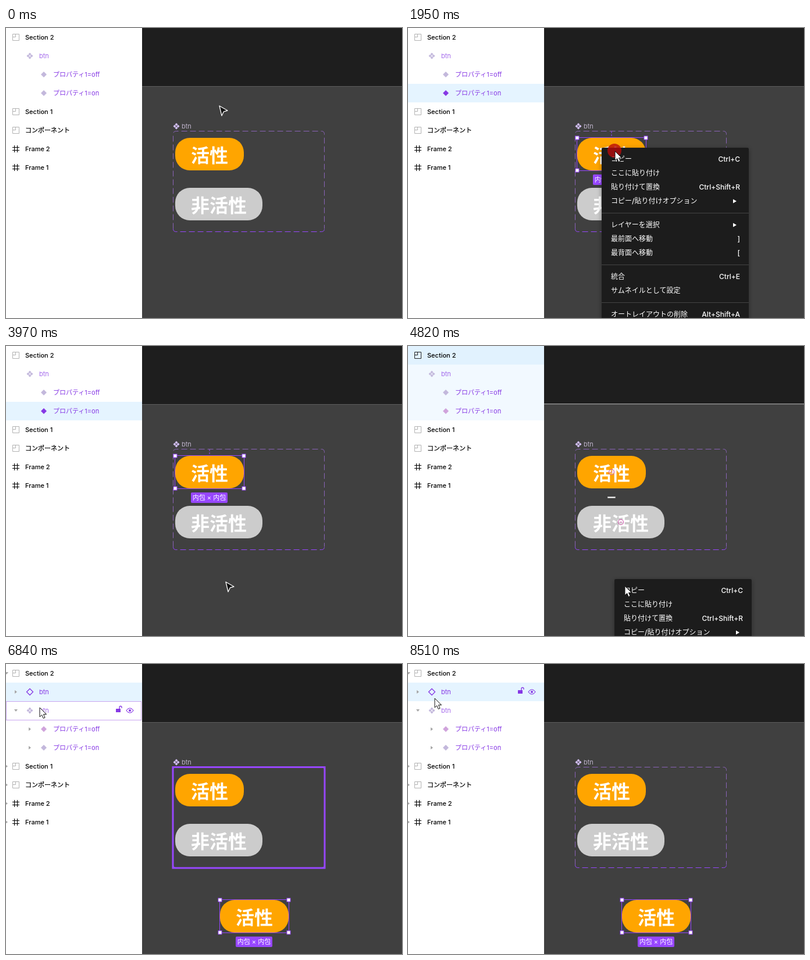
Write an HTML page that moves like this. It is 681x499 px and loops after 9.24 s.

```html
<!DOCTYPE html>
<html lang="ja">
<head>
<meta charset="utf-8">
<title>Component layers</title>
<style>
html, body { margin: 0; width: 100%; height: 100%; overflow: hidden; background: #1e1e1e; }
svg { display: block; width: 681px; height: 499px; }
text { font: 400 11px Inter, "Noto Sans CJK JP", "Noto Sans CJK", sans-serif; white-space: pre; }
.strong { font-weight: 500; fill: #000; }
.ja { stroke: #000; stroke-width: .25px; }
.purple { fill: #8638e5; }
.menu text { font-size: 12px; font-weight: 500; fill: #fff; }
.label { font-family: "Noto Sans CJK JP", "Noto Sans CJK", sans-serif; font-size: 32px; font-weight: 700; fill: #fff; }
.line { fill: none; stroke: #9747ff; }
.end { text-anchor: end; }
</style>
</head>
<body>
<svg id="stage" viewBox="0 0 681 499"></svg>
<script>
const LOOP = 9240;
const stage = document.getElementById('stage');

const rect = (x, y, w, h, fill, extra = '') =>
  `<rect x="${x}" y="${y}" width="${w}" height="${h}" fill="${fill}" ${extra}/>`;
const text = (x, y, s, cls = '', extra = '') =>
  `<text x="${x}" y="${y}" class="${cls}" ${extra}>${s}</text>`;
const path = (d, fill, extra = '') => `<path d="${d}" fill="${fill}" ${extra}/>`;
const group = (id, body, extra = '') => `<g id="${id}" ${extra}>${body}</g>`;
const outline = (x, y, w, h, sw) => `<rect class="line" x="${x}" y="${y}" width="${w}" height="${h}" stroke-width="${sw}"/>`;
const diamond = (x, y, r) => `M${x} ${y - r}l${r} ${r}l${-r} ${r}l${-r} ${-r}z`;
const fourDiamonds = (x, y) =>
  [[0, -3], [3, 0], [0, 3], [-3, 0]].map(([a, b]) => diamond(x + a, y + b, 2.5)).join('');

// Canvas parts
const button = (x, y, w, fill, s) =>
  rect(x, y, w, 56, fill, 'rx="25"') + text(x + 27, y + 42, s, 'label');

const selection = (x, y) => outline(x - .5, y - .5, 119, 57, 1) +
  [[0, 0], [118, 0], [0, 56], [118, 56]].map(([a, b]) =>
    rect(x + a - 3, y + b - 3, 6, 6, '#fff', 'stroke="#9747ff"')).join('');

const tag = (x, y) => rect(x, y, 63, 18, '#9747ff', 'rx="2"') +
  text(x + 31.5, y + 13, '内包 × 内包', '', 'fill="#fff" text-anchor="middle"');

const marker = (x, y) => `<circle cx="${x}" cy="${y}" r="4.5" fill="#fff" fill-opacity=".3" stroke="#d05cae" stroke-width="1.2"/>` +
  path(`M${x - 2} ${y}h4`, 'none', 'stroke="#d05cae"');

const dashed = (d, color) => path(d, 'none', `stroke="${color}" stroke-dasharray="10 5"`);

const MENU = [
  [20, 'コピー', 'Ctrl+C'], [44, 'ここに貼り付け'], [68, '貼り付けて置換', 'Ctrl+Shift+R'],
  [92, 'コピー/貼り付けオプション', '>'], [133, 'レイヤーを選択', '>'],
  [157, '最前面へ移動', ']'], [181, '最背面へ移動', '['], [222, '統合', 'Ctrl+E'],
  [246, 'サムネイルとして設定'], [287, 'オートレイアウトの削除', 'Alt+Shift+A']
];

function menu(id, x, y, w) {
  const items = MENU.map(([dy, name, key]) => text(16, dy + 4, name) +
    (key === '>' ? path(`M${w - 27} ${dy - 3.5}l6 3.5l-6 3.5z`, '#fff')
      : key ? text(w - 15, dy + 4, key, 'end') : '')).join('');
  const rules = [112, 201, 266].map(dy => rect(0, dy, w, 1, '#444')).join('');
  return group(id, rect(0, 0, w, 320, '#1e1e1e', 'rx="2" filter="url(#shadow)"') +
    rect(0, 8, w, 24, '#0d99ff', `id="${id}Hot"`) + rules + items,
    `class="menu" transform="translate(${x} ${y})"`);
}

// Layer panel
const SOFT = '#c3b8dc', PINK = '#d0a3dc', VIVID = '#8638e5';
const ROWS = [
  [0, 'section', 'Section 2', 'v'], [1, 'set', 'btn', 'v'],
  [2, 'variant', 'プロパティ1=off', '>'], [2, 'variant', 'プロパティ1=on', '>'],
  [0, 'section', 'Section 1', '>'], [0, 'section', 'コンポーネント', '>'],
  [0, 'frame', 'Frame 2', '>'], [0, 'frame', 'Frame 1', '>']
];
const INSTANCE = [1, 'instance', 'btn', '>'];

function icon(kind, x, y, color) {
  if (kind === 'section') return path(`M${x - 5.5} ${y - 5.5}h11v11h-11zM${x - 5.5} ${y - .5}h5v-5`, 'none', `stroke="${color}"`);
  if (kind === 'set') return path(fourDiamonds(x, y), color);
  if (kind === 'variant') return path(diamond(x, y, 5), color);
  if (kind === 'instance') return path(diamond(x, y, 5.5), 'none', `stroke="${VIVID}" stroke-width="1.3"`);
  return path(`M${x - 2.5} ${y - 6}v12M${x + 2.5} ${y - 6}v12M${x - 6} ${y - 2.5}h12M${x - 6} ${y + 2.5}h12`, 'none', 'stroke="#000" stroke-width="1.1"');
}

function panel(mode) {
  const rows = mode === 'pasted' ? [ROWS[0], INSTANCE, ...ROWS.slice(1)] : ROWS;
  let out = rect(0, 0, 234, 499, '#fff');
  if (mode === 'variant') out += rect(0, 96, 234, 32, '#e5f4ff');
  if (mode === 'pasted') out += rect(0, 32, 234, 32, '#e5f4ff');
  if (mode === 'section') out += rect(0, 0, 234, 32, '#e1f2fe') + rect(0, 32, 234, 96, '#f2f9ff');
  let carets = '';
  rows.forEach(([depth, kind, name, caret], i) => {
    const x = 17 + depth * 24, y = 16 + i * 32;
    let color = kind === 'section' ? '#b3b3b3' : SOFT;
    if (mode === 'section' && i === 0) color = '#222';
    if (mode === 'variant' && i === 3) color = VIVID;
    if ((mode === 'section' || mode === 'pasted') && i === 3) color = PINK;
    const cls = depth ? 'purple' : name === 'コンポーネント' ? 'strong ja' : 'strong';
    out += icon(kind, x, y, color) +
      text(x + 16, y + 4, name, cls, kind === 'set' ? 'opacity=".75"' : '');
    const cx = depth ? x - 24 : 1;
    carets += path(caret === 'v' ? `M${cx - 3} ${y - 2}h6l-3 4z` : `M${cx - 2} ${y - 3}l4 3l-4 3z`, '#a6a6a6');
  });
  return out + group('carets', carets);
}

const tools = rect(189, 11, 8, 6, VIVID, 'rx=".5"') +
  path('M195 11v-2.5a2 2 0 0 1 4 0v1.5', 'none', `stroke="${VIVID}" stroke-width="1.3"`) +
  path('M207 14q6 -8 12 0q-6 8 -12 0z', 'none', `stroke="${VIVID}" stroke-width="1.2"`) +
  `<circle cx="213" cy="14" r="2" fill="${VIVID}"/>`;

stage.innerHTML =
  '<defs><filter id="shadow" x="-10%" y="-10%" width="120%" height="120%"><feDropShadow dx="0" dy="2" stdDeviation="4" flood-opacity=".35"/></filter></defs>' +
  rect(234, 0, 447, 100, '#1e1e1e') + rect(234, 100, 447, 399, '#404040') +
  rect(234, 100, 447, 1, '#5c5c5c') +
  group('sectionLine', rect(234, 99, 447, 1, '#999')) +
  group('sectionHover', rect(234, 99, 447, 2, '#0d99ff')) +
  path(fourDiamonds(293, 169), '#d3bff5') +
  text(302, 173, 'btn', '', 'fill="#bdb3c9"') +
  dashed('M287.5 345.5v-163q0 -5 5 -5h250q5 0 5 5v163', '#8a63b8') +
  dashed('M287.5 345.5q0 5 5 5h250q5 0 5 -5', '#9747ff') +
  button(291, 189, 118, '#ffa500', '活性') +
  button(291, 275, 150, '#ccc', '非活性') +
  group('markers', marker(350, 217) + marker(366, 303) + rect(343.5, 259.5, 13, 2, '#fff', 'stroke="#bbb" stroke-width=".6"')) +
  group('onHover', outline(290, 188, 120, 58, 2)) +
  group('offHover', outline(290, 274, 152, 58, 2)) +
  group('setHover', outline(287, 177.5, 261, 173.5, 3)) +
  group('picked', path('M350 178v10', 'none', 'stroke="#9747ff" stroke-dasharray="3 2"') + selection(291, 189) + tag(318, 252)) +
  group('padding', [[350, 196], [305, 217], [396, 217], [350, 238]].map(([x, y]) =>
    path(diamond(x, y, 2.2), '#fff', 'stroke="#99795a" stroke-width=".8"')).join('') +
    rect(342, 273, 16, 16, '#9747ff', 'rx="2"') + path('M350 276v10M345 281h10', 'none', 'stroke="#fff" stroke-width="1.4"')) +
  group('copy', button(368, 406, 118, '#ffa500', '活性') + selection(368, 406)) +
  group('copyTag', tag(395, 469)) +
  group('panel', '') +
  group('rowHover', rect(.5, .5, 232, 32, 'none', 'stroke="#c9a6f0"')) +
  group('tools', tools) +
  menu('menuA', 333, 206, 253) + menu('menuB', 355, 401, 236) +
  group('click', '<circle r="12" fill="#b80a0a" fill-opacity=".78"/>') +
  group('pen', path('M0 0L14 8L7.5 9.8L4 17z', '#111', 'stroke="#fff" stroke-width="1.3" stroke-linejoin="round"')) +
  group('arrow', path('M0 0V16L3.7 12.6L6.2 18.5L9 17.3L6.5 11.6H11.5z', '#fff', 'stroke="#111" stroke-width="1"'));

const el = {};
stage.querySelectorAll('[id]').forEach(n => { el[n.id] = n; });
const show = (id, on) => { el[id].style.display = on ? '' : 'none'; };
const move = (id, x, y) => el[id].setAttribute('transform', `translate(${x} ${y})`);

// start, end, steps, evenly timed points of the pointer
const MOVES = [
  [950, 1420, 8, [[367, 134], [366, 152], [361, 187], [357, 207], [356, 212]]],
  [2490, 2690, 4, [[356, 212], [361, 225], [367, 242], [371, 252], [371, 229]]],
  [3490, 3970, 8, [[371, 229], [373, 262], [376, 320], [378, 382], [378, 406]]],
  [4820, 5020, 4, [[378, 406], [373, 413], [381, 426], [388, 437], [390, 441]]],
  [6420, 7320, 14, [[390, 441], [220, 250], [58, 75], [70, 84], [64, 78]]],
  [7390, 8300, 14, [[64, 78], [72, 48], [74, 22], [70, 82], [76, 57]]],
  [8370, 8510, 3, [[76, 57], [66, 57], [55, 58], [46, 59]]]
];
const CLICKS = [[1890, 2020], [2960, 3090], [4170, 4360], [5550, 5620]];
const within = (t, a, b) => t >= a && t < b;

function pointer(t) {
  let pos = MOVES[0][3][0];
  for (const [a, b, n, pts] of MOVES) {
    if (t < a) break;
    const step = Math.min(n, Math.floor((t - a) / (b - a) * (n - 1) + .01) + 1);
    const u = step / n * (pts.length - 1), i = Math.min(pts.length - 2, Math.floor(u)), f = u - i;
    pos = [0, 1].map(k => pts[i][k] + (pts[i + 1][k] - pts[i][k]) * f);
  }
  return pos;
}

let shown = '';
function draw(t) {
  const [x, y] = pointer(t);
  const mode = t < 1890 ? 'plain' : t < 4170 ? 'variant' : t < 5750 ? 'section' : 'pasted';
  if (mode !== shown) {
    el.panel.innerHTML = panel(shown = mode);
    el.carets = el.panel.querySelector('#carets');
  }
  const menuA = within(t, 1950, 2960), menuB = within(t, 4230, 5620), open = menuA || menuB;
  const inPanel = x < 234, pasted = mode === 'pasted';
  const over = (a, b, w) => !open && x >= a && x < a + w && y >= b && y < b + 56;
  const overOn = over(291, 189, 118), overOff = over(291, 275, 150);

  let row = -1;
  if (inPanel) row = Math.floor(y / 32);
  else if (overOn) row = pasted ? 4 : 3;
  else if (overOff) row = pasted ? 3 : 2;
  const chosen = { variant: 3, section: 0, pasted: 1 }[mode];

  show('carets', pasted && inPanel);
  show('rowHover', row >= 0 && row !== chosen && row < 9);
  move('rowHover', 0, row * 32);
  const flash = within(t, 2960, 3090);
  show('tools', inPanel || flash);
  move('tools', 0, (flash ? 3 : row) * 32 + 2);

  show('onHover', overOn && mode !== 'variant');
  show('offHover', overOff);
  show('setHover', inPanel && row === 2);
  show('sectionHover', inPanel && row === 0);
  show('sectionLine', mode === 'section');
  show('markers', mode === 'section');
  show('picked', mode === 'variant');
  show('padding', mode === 'variant' && t >= 2290 && (open || overOn));
  show('copy', pasted);
  show('copyTag', t >= 5820);

  show('menuA', menuA);
  show('menuB', menuB);
  show('menuAHot', t >= 2550);
  el.menuAHot.setAttribute('y', within(t, 2620, 2690) ? 32 : 8);
  show('menuBHot', t >= 4880);
  el.menuBHot.setAttribute('y', t >= 4950 ? 32 : 8);

  show('click', CLICKS.some(([a, b]) => within(t, a, b)));
  move('click', x - 1, y - 1);
  show('pen', !open && !inPanel);
  show('arrow', open || inPanel);
  move('pen', x, y);
  move('arrow', x, y);
}

const start = performance.now();
function tick() {
  draw((performance.now() - start) % LOOP);
  requestAnimationFrame(tick);
}
tick();
</script>
</body>
</html>
```
